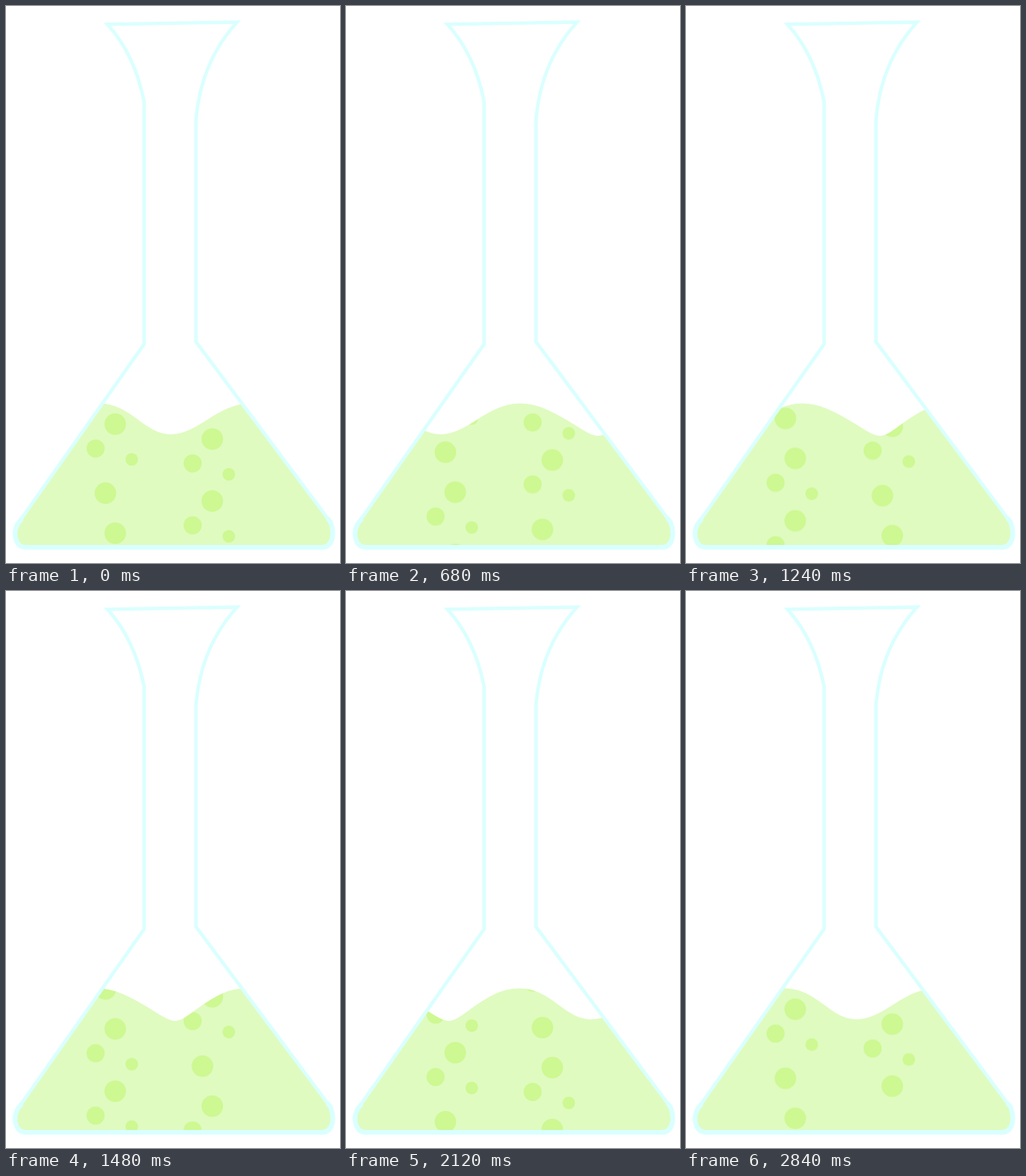
An HTML page for the animation above (2880 ms loop, 425x710 px).

```html
<!DOCTYPE html>
<html lang="en">
<head>
<meta charset="utf-8">
<title>Bubbling flask</title>
<style>
  html, body { margin: 0; width: 100%; height: 100%; overflow: hidden; background: #fff; }
  svg { display: block; width: 100vw; height: 100vh; }
  .liquid { fill: #dffbc0; }
  .air { fill: #fff; animation: slosh 2.88s steps(72) -2ms infinite; }
  .bubbles { fill: #cdf892; animation: rise 2.88s steps(72) -2ms infinite; }
  .glass { fill: none; stroke: #daffff; stroke-width: 4.4; stroke-miterlimit: 8; }
  .base { stroke-width: 6; stroke-linecap: round; }
  @keyframes slosh { to { transform: translateX(-379px); } }
  @keyframes rise { to { transform: translateY(-221.5px); } }
</style>
</head>
<body>
<svg viewBox="0 0 425 710">
  <defs>
    <clipPath id="body">
      <path d="M175 431 L15 660 C8 672 12 688 25 688 H402 C415 688 418 672 413 658 L242 428Z"/>
    </clipPath>
    <g id="cluster">
      <circle r="13.7"/>
      <circle cx="-25" cy="31" r="11.5"/>
      <circle cx="21" cy="45" r="8"/>
    </g>
    <circle id="big" r="13.7"/>
  </defs>

  <g clip-path="url(#body)">
    <rect class="liquid" y="500" width="425" height="210"/>
    <g class="bubbles">
      <use href="#cluster" x="139" y="533"/>
      <use href="#big" x="126.5" y="621"/>
      <use href="#cluster" x="139" y="672"/>
      <use href="#cluster" x="139" y="751.5"/>
      <use href="#big" x="126.5" y="839.5"/>
      <use href="#big" x="139" y="890.5"/>

      <use href="#cluster" x="262.5" y="552"/>
      <use href="#cluster" x="262.5" y="631"/>
      <use href="#big" x="250" y="719.5"/>
      <use href="#cluster" x="262.5" y="770.5"/>
      <use href="#big" x="262.5" y="849.5"/>
    </g>
    <!-- Empty space above the moving surface; every other trough is narrower -->
    <path class="air" d="M29 548 C47 548 76 506.5 118 506.5 S175 546 210 546 S269 506.5 311 506.5
      S392 548 410 548 S457 506.5 499 506.5 S556 546 591 546 S650 506.5 692 506.5
      S773 548 791 548 V400 H29Z"/>
  </g>

  <path class="glass" d="M129 23.3 Q164 62 175.7 122 V431 L15 660 C8 672 12 690 25 690 H402
    C415 690 419 674 413 658 L241.7 428 V145 Q248 71 294 20.5Z"/>
  <path class="glass base" d="M19 655 L15 660 C8 672 12 690 25 690 H402 C415 690 419 674 413 658 L410 654"/>
</svg>
</body>
</html>
```
